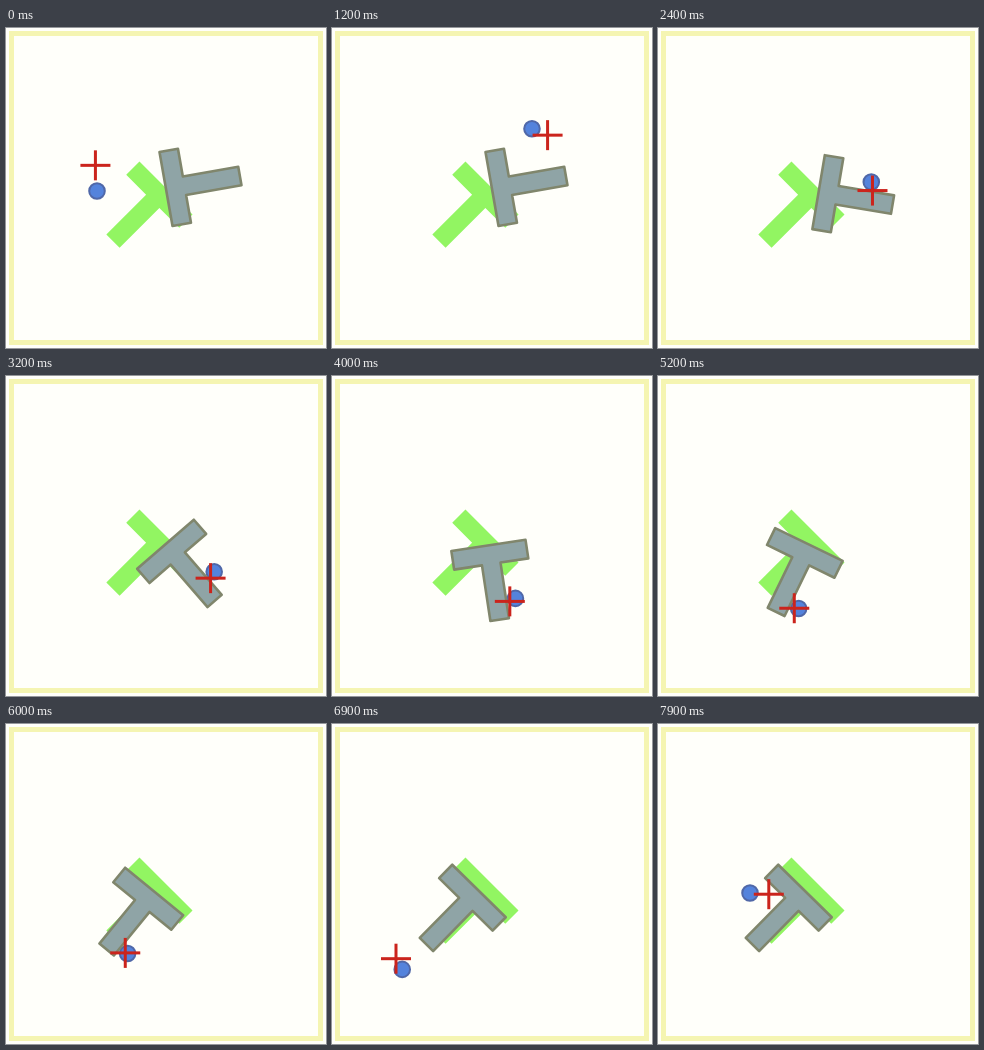
Animation of 320 by 320 pixels, one loop 8 s. Source, as an HTML page with a canvas:

```html
<!DOCTYPE html>
<html lang="en">
<head>
<meta charset="utf-8">
<title>Push the T</title>
<style>
  html, body { margin: 0; width: 100%; height: 100%; overflow: hidden; background: #fffffa; }
  canvas { display: block; }
</style>
</head>
<body>
<canvas id="stage" width="320" height="320"></canvas>
<script>
const ctx = document.getElementById('stage').getContext('2d');
const LOOP = 8000, STEP = 100;
const BAR = 75, THICK = 18.75;
const CONTACT = 2050, RELEASE = 6300, PUSH = 4800;
const LEAD = 150; // the cross marks where the agent is heading

const clamp = v => Math.max(0, Math.min(1, v));
const turned = t => 1 - (1 - clamp((t - CONTACT) / PUSH)) ** 1.92;

// The block turns clockwise while its origin swings out and back
function blockPose(t) {
  const f = turned(t), bulge = 20 * f * (1 - f);
  return {
    x: 160 - 13 * f + bulge,
    y: 161 + 6 * f + bulge,
    angle: (260 + 144.5 * f) * Math.PI / 180
  };
}

// The point on the stem's side where the agent pushes, sliding outwards
function contactPoint(t) {
  const { x, y, angle } = blockPose(t);
  const reach = 50 + 16 * turned(t) ** 2;
  const c = Math.cos(angle), s = Math.sin(angle);
  return [x + THICK * c - reach * s, y + THICK * s + reach * c];
}

function bezier(u, a, b, c, d) {
  const v = 1 - u;
  return a.map((_, i) =>
    v * v * v * a[i] + 3 * v * v * u * b[i] + 3 * v * u * u * c[i] + u * u * u * d[i]);
}

function agentAt(t) {
  if (t < CONTACT)
    return bezier(t / CONTACT, [91, 163], [65, 30], [311, 125], contactPoint(CONTACT));
  if (t < RELEASE) return contactPoint(t);
  return bezier((t - RELEASE) / (LOOP - RELEASE),
    contactPoint(RELEASE), [60, 310], [30, 160], [104, 169]);
}

function drawT({ x, y, angle }, fill, outline) {
  ctx.save();
  ctx.translate(x, y);
  ctx.rotate(angle);
  const shape = new Path2D();
  const w = BAR / 2, s = THICK / 2;
  [[-w, 0], [w, 0], [w, THICK], [s, THICK], [s, BAR], [-s, BAR], [-s, THICK], [-w, THICK]]
    .forEach(p => shape.lineTo(...p));
  shape.closePath();
  ctx.fillStyle = fill;
  ctx.fill(shape);
  if (outline) {
    ctx.strokeStyle = outline;
    ctx.lineWidth = 2.6;
    ctx.lineJoin = 'round';
    ctx.stroke(shape);
  }
  ctx.restore();
}

function drawAgent([x, y]) {
  ctx.beginPath();
  ctx.arc(x, y, 7.8, 0, 2 * Math.PI);
  ctx.fillStyle = '#5483dc';
  ctx.fill();
  ctx.strokeStyle = '#5068a8';
  ctx.lineWidth = 2;
  ctx.stroke();
}

function drawCross([x, y]) {
  ctx.fillStyle = '#cb241c';
  ctx.fillRect(x - 15, y - 1.5, 30, 3);
  ctx.fillRect(x - 1.5, y - 15, 3, 30);
}

function draw(now) {
  const t = Math.floor(now % LOOP / STEP) * STEP;
  ctx.fillStyle = '#fffffa';
  ctx.fillRect(0, 0, 320, 320);
  ctx.strokeStyle = '#f5f5b2';
  ctx.lineWidth = 5;
  ctx.strokeRect(5.5, 5.5, 309, 309);
  drawT({ x: 160, y: 160, angle: Math.PI / 4 }, '#92f562');
  drawAgent(agentAt(t));
  drawT(blockPose(t), '#8fa4a6', '#80866c');
  drawCross(agentAt(t + LEAD));
}

const start = performance.now();
function tick() {
  draw(performance.now() - start);
  requestAnimationFrame(tick);
}
tick();
</script>
</body>
</html>
```
